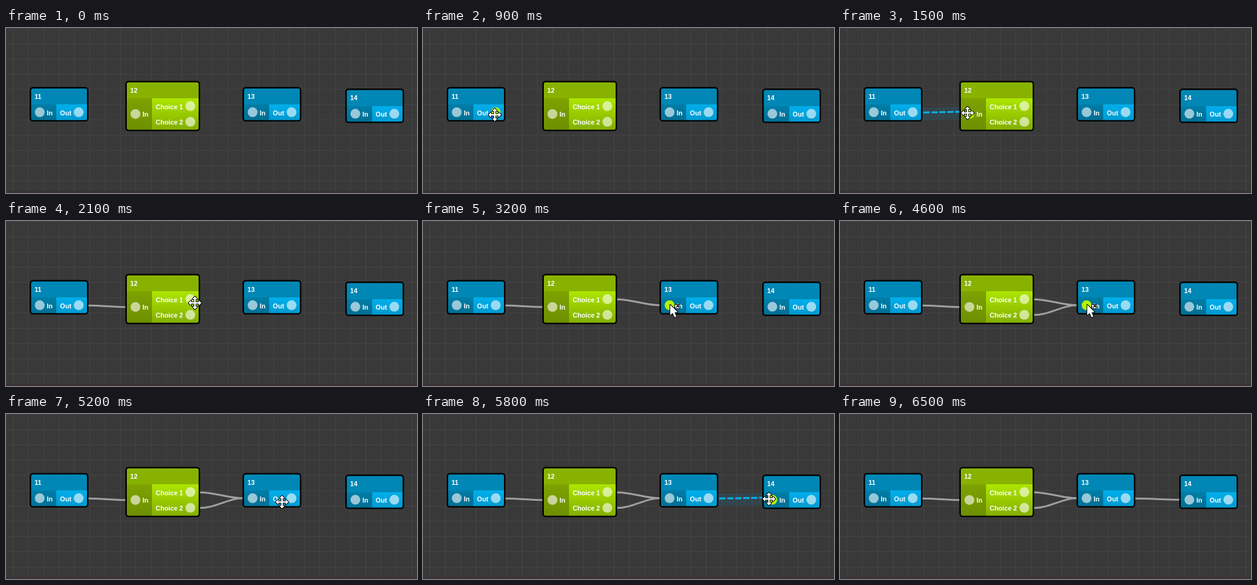
These frames come from a looping animation (670x270 px, 7100 ms). An HTML page with a canvas:

```html
<!DOCTYPE html>
<html lang="en">
<head>
<meta charset="utf-8">
<title>Connecting nodes</title>
<style>
html, body { margin: 0; width: 670px; height: 270px; overflow: hidden; background: #393939; }
canvas { display: block; }
</style>
</head>
<body>
<canvas width="670" height="270"></canvas>
<script>
const ctx = document.querySelector('canvas').getContext('2d');
const LOOP = 7100, STEP = 100;
const HEAD = 28, ROW = 25.7, SPLIT = 43, RADIUS = 8;
const FONT = 'bold 10.7px "Liberation Sans", Arial, sans-serif';
const BLUE = { head: '#0087b5', in: '#007da7', out: '#00afec' };
const GREEN = { head: '#88b200', in: '#7da200', out: '#ade600' };

function makeNode(name, x, y, w, skin, outs) {
  return {
    name, x, y, w, skin, outs,
    h: HEAD + ROW * outs.length + 2,
    inPort: { x: x + 16, y: y + HEAD + ROW * outs.length / 2 },
    outPorts: outs.map((_, i) => ({ x: x + w - 15.5, y: y + HEAD + ROW * (i + .5) }))
  };
}
const nodes = [
  makeNode('11', 39, 97, 95, BLUE, ['Out']),
  makeNode('12', 195, 87, 121, GREEN, ['Choice 1', 'Choice 2']),
  makeNode('13', 386, 97, 95, BLUE, ['Out']),
  makeNode('14', 553.5, 99.5, 95, BLUE, ['Out'])
];
const ports = nodes.flatMap(n => [n.inPort, ...n.outPorts]);

// The pointer passes the via points, waits on an output, drags to an input and drops there.
const at = (step, x, y) => ({ step, x, y });
const links = [
  { from: 0, out: 0, to: 1, arrive: 10, press: 11, reach: 16, drop: 18, via: [at(3, 508, 95), at(7, 106, 145), at(9, 117, 142)] },
  { from: 1, out: 0, to: 2, arrive: 22, press: 24, reach: 30, drop: 32, via: [at(21, 308, 134)] },
  { from: 1, out: 1, to: 2, arrive: 39, press: 39, reach: 46, drop: 46, via: [at(35, 335, 157), at(37, 308, 155)] },
  { from: 2, out: 0, to: 3, arrive: 55, press: 55, reach: 59, drop: 63, via: [at(49, 317, 150), at(53, 494, 142)] }
];
const onPort = (step, p) => at(step, p.x + .5, p.y - 1.3);
const stops = links.flatMap(l => {
  const a = nodes[l.from].outPorts[l.out], b = nodes[l.to].inPort;
  return [...l.via, onPort(l.arrive, a), onPort(l.press, a), { ...onPort(l.reach, b), drag: true }, onPort(l.drop, b)];
}).concat(at(64, 617, 126));

function pointerAt(step) {
  const i = stops.findIndex(s => s.step >= step);
  if (i < 0 || step < stops[0].step) return null;
  const b = stops[i], a = stops[i - 1] || b;
  let k = (step - a.step) / (b.step - a.step || 1);
  if (b.drag) k = 1 - (1 - k) ** 2;
  return { x: Math.round(a.x + (b.x - a.x) * k), y: Math.round(a.y + (b.y - a.y) * k) };
}

const near = (p, port, r) => p && Math.hypot(p.x - port.x, p.y - port.y) < r;

// Flat box that darkens slightly towards its bottom; edges sit on whole pixels.
function box(x, y, w, h, color, dark = 0) {
  const top = Math.round(y), bottom = Math.round(y + h), left = Math.round(x);
  const shade = ctx.createLinearGradient(0, top, 0, bottom);
  shade.addColorStop(0, `rgba(0,0,0,${dark})`);
  shade.addColorStop(1, `rgba(0,0,0,${dark + .12})`);
  for (const fill of [color, shade]) {
    ctx.fillStyle = fill;
    ctx.fillRect(left, top, w, bottom - top);
  }
}

function label(s, x, y, align = 'left') {
  ctx.font = FONT;
  ctx.textAlign = align;
  ctx.fillStyle = '#fff';
  ctx.fillText(s, x, Math.round(y + 4.7));
}

function drawPort(port, pointer) {
  ctx.fillStyle = near(pointer, port, RADIUS) ? '#b4f400' : 'rgba(255,255,255,.6)';
  ctx.beginPath();
  ctx.arc(port.x, port.y, RADIUS, 0, 7);
  ctx.fill();
}

function drawNode({ name, x, y, w, h, skin, outs, inPort, outPorts }, pointer) {
  ctx.beginPath();
  ctx.roundRect(x + .8, y + .8, w - 1.6, h - 1.6, 4);
  ctx.save();
  ctx.clip();
  ctx.fillStyle = skin.head;
  ctx.fillRect(x, y, w, h);
  box(x, y + HEAD, SPLIT, h - HEAD, skin.in);
  outs.forEach((_, i) => box(x + SPLIT, y + HEAD + i * ROW, w - SPLIT, ROW, skin.out, i * .12));
  ctx.restore();
  ctx.lineWidth = 2.4;
  ctx.strokeStyle = '#000';
  ctx.stroke();

  label(name, x + 7.5, y + 14);
  label('In', inPort.x + 11.5, inPort.y);
  drawPort(inPort, pointer);
  outPorts.forEach((p, i) => {
    label(outs[i], p.x - 12, p.y, 'right');
    drawPort(p, pointer);
  });
}

function curve(x0, y0, x1, y1, width, color) {
  const pull = (x1 - x0) * .36;
  ctx.lineWidth = width;
  ctx.strokeStyle = color;
  ctx.beginPath();
  ctx.moveTo(x0, y0);
  ctx.bezierCurveTo(x0 + pull, y0, x1 - pull, y1, x1, y1);
  ctx.stroke();
}

function drawLink({ from, out, to, press, drop }, step, pointer) {
  if (step <= press) return;
  const a = nodes[from], b = nodes[to];
  const x = a.x + a.w, y = a.outPorts[out].y + .3;
  if (step >= drop) {
    curve(x, y, b.x + 1, b.inPort.y, 3, '#a0a0a0');
  } else if (pointer.x > x + 3) {
    curve(x, y + 2, pointer.x, pointer.y, 20, 'rgba(0,180,240,.1)');
    ctx.setLineDash([10, 3]);
    curve(x + 2, y, pointer.x, pointer.y - 2, 3, '#00b4f0');
    ctx.setLineDash([]);
  }
}

function outline(points, x, y) {
  ctx.beginPath();
  points.forEach(([px, py]) => ctx.lineTo(x + px, y + py));
  ctx.closePath();
  ctx.lineWidth = 2;
  ctx.lineJoin = 'round';
  ctx.strokeStyle = '#000';
  ctx.stroke();
  ctx.fillStyle = '#fff';
  ctx.fill();
}

const arrow = [[0, 0], [0, 17], [4, 13.5], [7, 20.5], [10, 19.2], [7.2, 12.5], [12, 12]];
const wing = [[-1.2, -1.2], [-1.2, -6], [-4.2, -6], [0, -10.5], [4.2, -6], [1.2, -6]];
const turn = ([x, y], quarters) => quarters ? turn([-y, x], quarters - 1) : [x, y];
const cross = [0, 1, 2, 3].flatMap(q => wing.map(p => turn(p, q)));

function drawPointer(p) {
  const linking = ports.some(port => near(p, port, 3));
  const inside = nodes.some(n => p.x >= n.x && p.x <= n.x + n.w && p.y >= n.y && p.y <= n.y + n.h);
  if (inside && !linking) return outline(cross, p.x, p.y);
  outline(arrow, p.x, p.y);
  if (!linking) return;
  // shortcut badge
  const x = p.x + 8, y = p.y;
  outline([[0, 0], [6, 0], [6, 6], [0, 6]], x, y);
  ctx.lineWidth = 1.2;
  ctx.beginPath();
  ctx.moveTo(x + 1, y + 5);
  ctx.lineTo(x + 5, y + 1);
  ctx.moveTo(x + 2, y + 1);
  ctx.lineTo(x + 5, y + 1);
  ctx.lineTo(x + 5, y + 4);
  ctx.stroke();
}

function drawGrid() {
  ctx.fillStyle = '#393939';
  ctx.fillRect(0, 0, 670, 270);
  ctx.fillStyle = '#444';
  for (let x = 11; x < 670; x += 25) ctx.fillRect(x, 0, 1, 270);
  for (let y = 0; y < 270; y += 25) ctx.fillRect(0, y, 670, 1);
  ctx.fillStyle = '#3b3033';
  ctx.fillRect(0, 267, 670, 3);
}

function frame(now) {
  const step = Math.floor(now % LOOP / STEP);
  const pointer = pointerAt(step);
  drawGrid();
  links.forEach(l => drawLink(l, step, pointer));
  nodes.forEach(n => drawNode(n, pointer));
  if (pointer) drawPointer(pointer);
  requestAnimationFrame(frame);
}
frame(performance.now());
</script>
</body>
</html>
```
